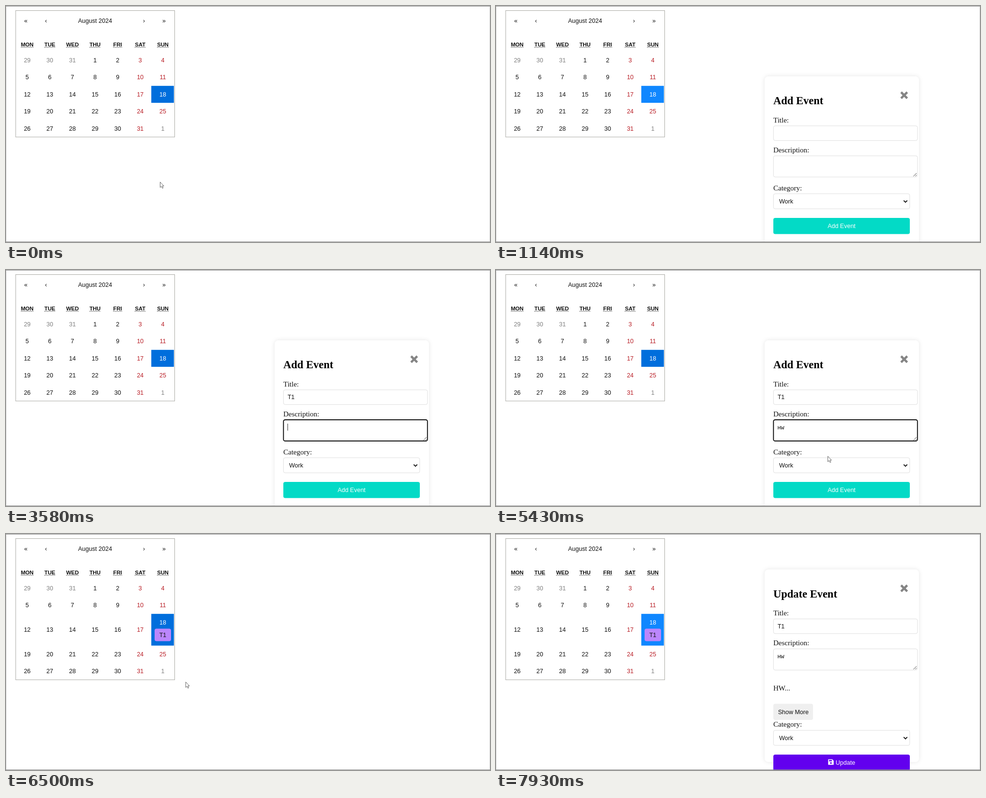
Recreate the animation shown at these times as an HTML page. Size 1000 by 490 pixels, loop 8000 ms.

```html
<!DOCTYPE html>
<html lang="en">
<head>
<meta charset="utf-8">
<title>Event calendar</title>
<style>
  html, body { margin: 0; width: 100%; height: 100%; overflow: hidden; background: #fff; }
  svg { display: block; width: 1000px; height: 490px; }
  text { font: 12.5px "Liberation Sans", Arial, sans-serif; fill: #111; white-space: pre; }
  .mid { text-anchor: middle; }
  .day { font-size: 11.25px; font-weight: bold; }
  .serif { font: 15px "Liberation Serif", "Times New Roman", serif; }
  .title { font: bold 22.5px "Liberation Serif", "Times New Roman", serif; fill: #000; }
  .mono { font: 11.7px "Liberation Mono", monospace; }
  .card { filter: drop-shadow(0 0 4px rgba(0, 0, 0, .1)); }
</style>
</head>
<body>
<svg id="stage" viewBox="0 0 1000 490"></svg>
<script>
const LOOP = 8000;
const OPEN_ADD = 910, FOCUS_TITLE = 1720, FOCUS_NOTE = 3470, SAVE = 5930, OPEN_UPDATE = 7190;
const COL = 46.7, LEFT = 20.5;
const DAYS = ['MON', 'TUE', 'WED', 'THU', 'FRI', 'SAT', 'SUN'];
const DAY_WIDTHS = [26, 23, 26, 23, 18.5, 23, 24];

// Pointer stops: time, x, y
const POINTER = [
  [0, 318, 365], [120, 318, 365], [640, 322, 188], [1150, 322, 188],
  [1620, 704, 265], [1720, 704, 265], [1940, 744, 307], [3050, 744, 307],
  [3300, 748, 328], [5200, 690, 340], [5430, 685, 386], [5750, 712, 452],
  [6080, 712, 452], [6500, 371, 307], [6780, 324, 210], [LOOP, 324, 210]
];

const between = (t, a, b) => t >= a && t < b;
const text = (x, y, s, cls = '', fill = '') =>
  `<text x="${x}" y="${y}" class="${cls}"${fill && ` style="fill:${fill}"`}>${s}</text>`;
const rect = (x, y, w, h, fill, r = 0, stroke = 'none', sw = 1) =>
  `<rect x="${x}" y="${y}" width="${w}" height="${h}" rx="${r}" fill="${fill}" stroke="${stroke}" stroke-width="${sw}"/>`;
const path = (d, stroke, sw = 1, fill = 'none', extra = '') =>
  `<path d="${d}" stroke="${stroke}" stroke-width="${sw}" fill="${fill}" ${extra}/>`;
const caret = (x, y) => path(`M${x} ${y}v14.5`, '#222');

function pointerAt(t) {
  const i = POINTER.findIndex(p => p[0] > t);
  const [t0, x0, y0] = POINTER[i - 1], [t1, x1, y1] = POINTER[i];
  const k = (t - t0) / (t1 - t0);
  return { x: x0 + (x1 - x0) * k, y: y0 + (y1 - y0) * k };
}

function calendar(t, p) {
  const grow = t >= SAVE ? 30.7 : 0;
  const tileFocused = between(t, OPEN_ADD, FOCUS_TITLE) || t >= OPEN_UPDATE;
  let out = rect(20, 9.5, 328.5, 262.5 + grow, '#fff', 0, '#a9a9a4');
  [[41, '«'], [82.5, '‹'], [184, 'August 2024'], [285, '›'], [326.5, '»']]
    .forEach(([x, s]) => out += text(x, 35, s, 'mid'));
  DAYS.forEach((d, i) => {
    const x = LEFT + COL * (i + .5), w = DAY_WIDTHS[i];
    out += text(x, 84, d, 'mid day')
      + path(`M${x - w / 2} 85.8h${w}`, '#222', 1, 'none', 'stroke-dasharray="1.5 1"');
  });
  for (let i = 0; i < 35; i++) {
    const row = Math.floor(i / 7), col = i % 7;
    const x = LEFT + COL * col;
    const y = 94.8 + 35.5 * row + (row > 2 ? grow : 0);
    const h = 35.5 + (row === 2 ? grow : 0);
    const num = i < 3 ? 29 + i : (i - 3) % 31 + 1;
    const active = i === 20;
    const hover = p.x >= x && p.x < x + COL && p.y >= y && p.y < y + h;
    if (active) out += rect(x - .5, y, COL, h - .3, hover || tileFocused ? '#1087ff' : '#006edc');
    else if (hover) out += rect(x, y, COL, h, '#e6e6e6');
    const color = active ? '#fff' : i < 3 || i === 34 ? '#808080' : col > 4 ? '#b81c24' : '#111';
    out += text(x + COL / 2, y + (active ? 17.75 : h / 2) + 4.2, num, 'mid', color);
  }
  if (grow) out += rect(307, 196.5, 34, 26, '#bb86fc', 4) + text(324, 213.7, 'T1', 'mid');
  return out;
}

const field = (y, w, h, focused) => focused
  ? rect(573.3, y, w, h, '#fff', 3.5, '#111', 1.9)
  : rect(573.3, y, w, h, '#fff', 3.5, '#dedede');

const button = (y, w, label, fill, color, x = 573 + w / 2) =>
  rect(573, y, w, 33.5, fill, 4) + text(x, y + 21.2, label, 'mid', color);

function modal(top, heading, title, note, focus) {
  let out = `<g class="card">${rect(555, top, 319, 400, '#fff', 8)}</g>`;
  out += text(573, top + 58, heading, 'title')
    + path(`M837 ${top + 33}l12.6 12.6m0-12.6l-12.6 12.6`, '#858585', 4.6)
    + text(573, top + 95.5, 'Title:', 'serif')
    + field(top + 102.8, 297.5, 30.5, focus === 'title')
    + text(581.7, top + 122.3, title)
    + text(573, top + 157.5, 'Description:', 'serif')
    + field(top + 165, 297.5, 44, focus === 'note')
    + text(581.5, top + 184.8, note, 'mono')
    + path(`M862.5 ${top + 207.5}l6.5-6.5m-2.5 6.5l2.5-2.5`, '#444');
  return out;
}

const category = y => text(573, y, 'Category:', 'serif')
  + field(y + 7.3, 281.5, 31.3) + text(585, y + 27.3, 'Work')
  + path(`M842.3 ${y + 21.3}l3.7 3.7 3.7-3.7`, '#111', 1.9);

function addModal(t) {
  const title = t < 2320 ? '' : t < 2500 ? 'T' : 'T1';
  const note = t < 4580 ? '' : t < 4780 ? 'H' : 'HW';
  const focus = t < FOCUS_TITLE ? '' : t < FOCUS_NOTE ? 'title' : 'note';
  let out = modal(146, 'Add Event', title, note, focus)
    + category(382.5) + button(440, 282, 'Add Event', '#03dac6', '#fff');
  if (between(t, FOCUS_TITLE, 3050)) out += caret([582, 589.5, 596.5][title.length], 257);
  if (between(t, FOCUS_NOTE, 4180) || between(t, 4580, 5240)) out += caret(582 + note.length * 7.2, 319);
  return out;
}

function updateModal() {
  const disk = path('M687 468.5h7.5l2.5 2.5v7.5h-10z', '#fff', 1.4, '#fff', 'stroke-linejoin="round"')
    + rect(688, 469.3, 6, 2.6, '#6200ee') + `<circle cx="692" cy="475.6" r="1.8" fill="#6200ee"/>`;
  return modal(73.5, 'Update Event', 'T1', 'HW')
    + text(573, 325, 'HW...', 'serif')
    + button(352.5, 82, 'Show More', '#efefef', '#111', 614.3)
    + category(400.3)
    + button(458, 282, 'Update', '#6200ee', '#fff', 722) + disk;
}

// Only the arrow shape is drawn; hand and text pointers stay invisible.
function arrow(t, { x, y }, adding) {
  const overCalendar = x < 348 && y < (t >= SAVE ? 303 : 272);
  const overField = adding && x > 573 && x < 871
    && [[248, 280], [311, 356], [389, 421], [440, 474]].some(([a, b]) => between(y, a, b));
  if (overCalendar || overField) return '';
  return path('M.5.5v11.3l2.6-2.3 1.9 4 1.8-.8-1.8-4h3.2z', '#555', .9, '#fff',
    `transform="translate(${x.toFixed(1)} ${y.toFixed(1)})"`);
}

function scene(t) {
  const p = pointerAt(t), adding = between(t, OPEN_ADD, SAVE);
  return rect(0, 0, 1000, 490, '#fff')
    + calendar(t, p)
    + (adding ? addModal(t) : t >= OPEN_UPDATE ? updateModal() : '')
    + path('M.5 0v490M999.5 0v490', '#d5d5d5')
    + path('M0 .5h1000M0 489.5h1000', '#8c8c8c')
    + arrow(t, p, adding);
}

const stage = document.getElementById('stage');
const start = performance.now();
let shown = '';
function tick() {
  const next = scene((performance.now() - start) % LOOP);
  if (next !== shown) stage.innerHTML = shown = next;
  requestAnimationFrame(tick);
}
tick();
</script>
</body>
</html>
```
